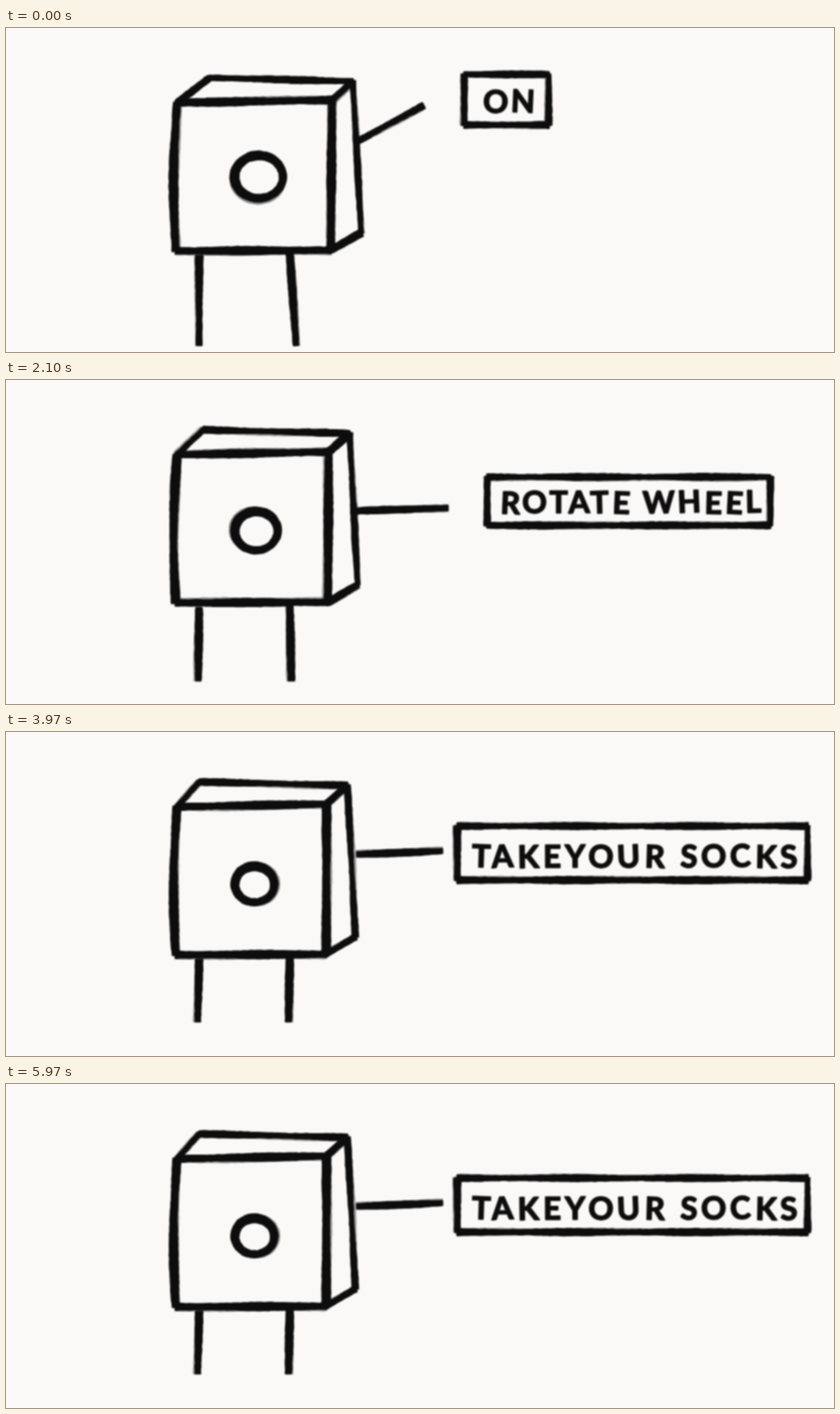
An HTML page that plays this animation: 1196x468 px, repeating every 6.01 s.

```html
<!DOCTYPE html>
<html lang="en">
<head>
<meta charset="utf-8">
<title>Machine instructions</title>
<style>
html, body { margin: 0; width: 100%; height: 100%; overflow: hidden; background: #fbf9f7; }
svg { display: block; width: 100vw; height: 100vh; }
text { font-family: Lato, 'Open Sans', sans-serif; font-weight: 700; text-anchor: middle; white-space: pre; }
</style>
</head>
<body>
<svg id="stage" viewBox="0 0 1196 468" preserveAspectRatio="none">
  <defs>
    <filter id="soft" filterUnits="userSpaceOnUse" x="0" y="0" width="1196" height="468">
      <feGaussianBlur stdDeviation="1.2"/>
    </filter>
  </defs>
</svg>
<script>
const LOOP = 6010, FIRST = 1000 / 3, BEAT = 2500 / 3;
const INK = '#0d0c10';
const stage = document.getElementById('stage');

// arm: shoulder y and tip; sign: left, top, right, bottom; gap: letter spacing in em
const scenes = [
  { label: 'ON', arm: [164, 603, 112], sign: [662, 67, 784, 140], size: 45, gap: .08 },
  { label: 'POUR', arm: [178, 628, 223], sign: [673, 211, 881, 286], size: 45, gap: .18 },
  { label: 'SET TIMER', arm: [182, 614, 350], sign: [667, 368, 1012, 437], size: 46, gap: .19 },
  { label: 'ROTATE WHEEL', arm: [189, 638, 185], sign: [695, 140, 1104, 210], size: 44, gap: .1 },
  { label: 'OFF', arm: [184, 607, 276], sign: [650, 291, 853, 371], size: 58, gap: .3 },
  { label: 'TAKEYOUR SOCKS', arm: [177, 630, 172], sign: [652, 136, 1158, 214], size: 45, gap: .13 }
];

let seed = 7;
const rand = () => (seed = seed * 16807 % 2147483647) / 2147483647;
const jitter = n => (rand() - .5) * 2 * n;

function add(parent, name, attrs) {
  const el = document.createElementNS('http://www.w3.org/2000/svg', name);
  for (const key in attrs) el.setAttribute(key, attrs[key]);
  return parent.appendChild(el);
}

// Ribbon along at(u) = [x, y], with uneven pressure and a rough edge.
function ribbon(group, at, length, width, opacity = 1) {
  const steps = Math.ceil(length / 5), phase = rand() * 6, left = [], right = [];
  for (let i = 0; i <= steps; i++) {
    const u = i / steps, [x, y] = at(u), [ax, ay] = at(u - .01), [bx, by] = at(u + .01);
    const dx = bx - ax, dy = by - ay, len = Math.hypot(dx, dy);
    const half = width / 2 + .7 * Math.sin(phase + u * length / 28);
    const side = sign => {
      const r = sign * (half - 1.5 + jitter(.4));
      return `${(x - dy / len * r).toFixed(1)} ${(y + dx / len * r).toFixed(1)}`;
    };
    left.push(side(1));
    right.unshift(side(-1));
  }
  add(group, 'path', { d: 'M' + left.concat(right).join('L') + 'Z', opacity });
}

// A dark stroke over a paler, slightly shifted one.
function line(group, [x0, y0], [x1, y1], width, bow = 0) {
  const length = Math.hypot(x1 - x0, y1 - y0);
  const nx = (y0 - y1) / length, ny = (x1 - x0) / length;
  const path = shift => u => {
    const off = shift + bow * Math.sin(Math.PI * u);
    return [x0 + (x1 - x0) * u + nx * off, y0 + (y1 - y0) * u + ny * off];
  };
  ribbon(group, path(jitter(1.5)), length, width, .35);
  ribbon(group, path(0), length, width);
}

function ring(group, cx, cy, rx, ry, width, opacity) {
  const at = u => {
    const a = u * 2 * Math.PI - 2;
    return [cx + rx * Math.cos(a), cy + ry * Math.sin(a)];
  };
  ribbon(group, at, Math.PI * (rx + ry), width, opacity);
}

// The machine narrows and its legs shorten a little from scene to scene.
function drawMachine(group, i) {
  const topLeft = [247, 108], bottomLeft = [245, 322];
  const topRight = [471 - 1.6 * i, 104], bottomRight = [469 - 1.3 * i, 321];
  const backLeft = [294 - 3 * i, 72], backRight = [501 - 1.6 * i, 77];
  const backBottom = [513 - 1.7 * i, 296];
  line(group, topLeft, bottomLeft, 13, 4);
  line(group, topLeft, topRight, 12);
  line(group, bottomLeft, bottomRight, 12);
  line(group, topRight, bottomRight, 13);
  line(group, topLeft, backLeft, 10);
  line(group, backLeft, backRight, 10);
  line(group, topRight, backRight, 11);
  line(group, backRight, backBottom, 9.5);
  line(group, bottomRight, backBottom, 11);

  const foot = 458 - 8 * i, cx = 365 - 1.2 * i, cy = 215 + i;
  line(group, [279, 329], [279 - .4 * i, foot], 11);
  line(group, [410, 327], [419 - 2.2 * i, foot], 11.5);
  ring(group, cx + jitter(3), cy + jitter(3), 37 - 1.3 * i, 33 - i, 9, .4);
  ring(group, cx, cy, 35 - 1.3 * i, 31 - i, 13, 1);
}

function drawSign(group, { label, sign: [x0, y0, x1, y1], size, gap }) {
  line(group, [x0, y0], [x1, y0], 10);
  line(group, [x0, y1], [x1, y1], 10.5);
  line(group, [x0, y0], [x0, y1], 11);
  line(group, [x1, y0], [x1, y1], 9.5);

  const lifts = [...label].map(() => jitter(1.2));
  add(group, 'text', {
    x: (x0 + x1) / 2 + 3 + size * gap / 2, y: y1 - 18,
    dy: lifts.map((v, k) => (v - (lifts[k - 1] || 0)).toFixed(1)).join(' '),
    rotate: lifts.map(() => jitter(3).toFixed(1)).join(' '),
    'font-size': size, 'letter-spacing': size * gap, 'stroke-width': 2
  }).textContent = label;
}

scenes.forEach((scene, i) => {
  scene.at = i ? FIRST + BEAT * (i - 1) : 0;
  const group = scene.group = add(stage, 'g', {
    filter: 'url(#soft)', fill: INK, stroke: INK, 'stroke-width': 3, 'stroke-linejoin': 'round'
  });
  const [shoulder, tipX, tipY] = scene.arm;
  drawMachine(group, i);
  line(group, [507, shoulder], [tipX, tipY], 10.5);
  drawSign(group, scene);
});

const start = performance.now();
function render(now) {
  const t = Math.max(0, now - start) % LOOP;
  const current = scenes.filter(s => s.at <= t).pop();
  for (const s of scenes) s.group.style.display = s === current ? '' : 'none';
  requestAnimationFrame(render);
}
render(start);
</script>
</body>
</html>
```
